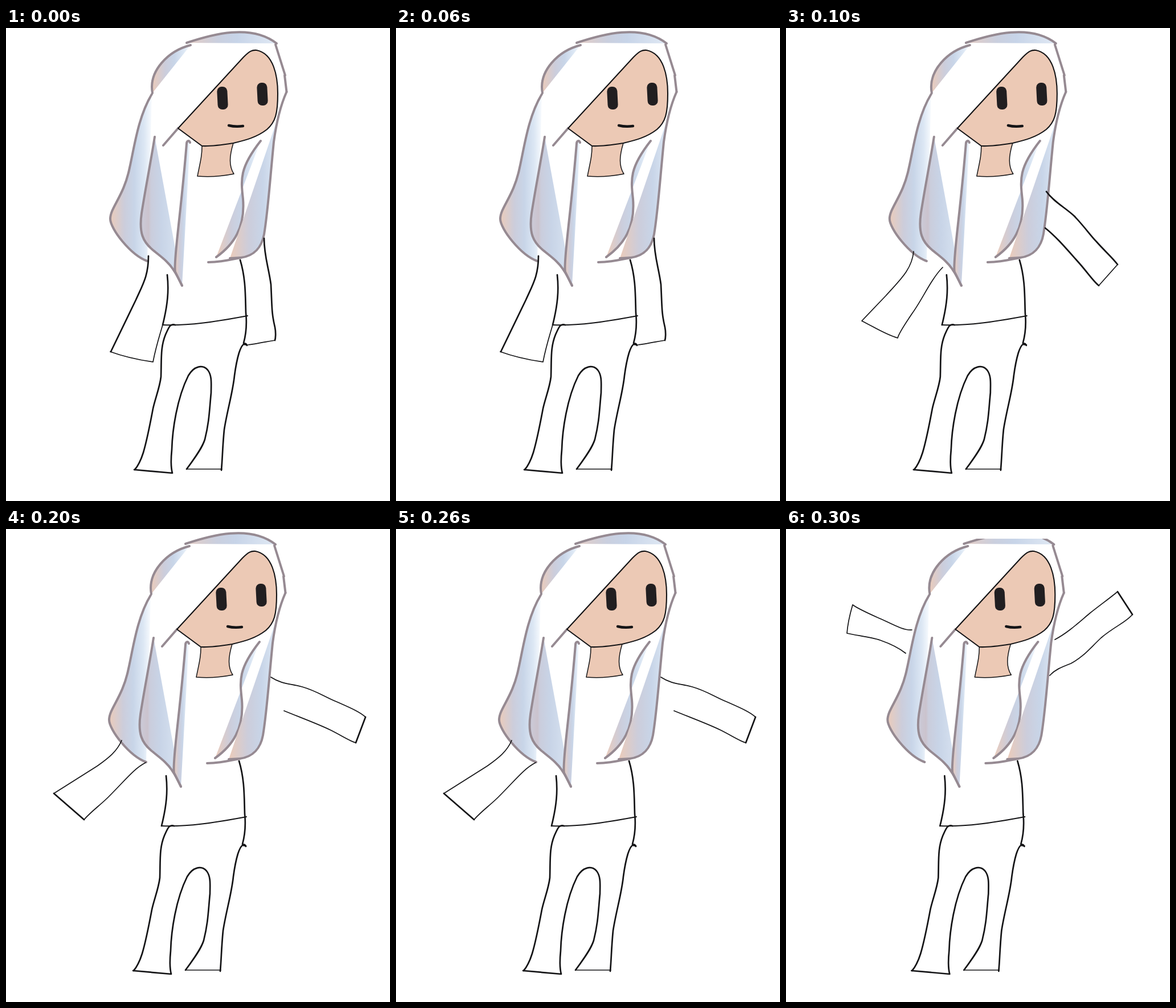
Write an HTML page that moves like this. It is 674 px wide and 830 px high and loops after 0.4 s.

```html
<!DOCTYPE html>
<html lang="en">
<head>
<meta charset="utf-8">
<title>Waving figure</title>
<style>
html, body { margin: 0; width: 100%; height: 100%; overflow: hidden; background: #fff; }
svg { display: block; width: 674px; height: 830px; }
path { fill: none; stroke-linejoin: round; stroke-linecap: round; }
.hair { stroke: #968a92; stroke-width: 4; }
.shaded { fill: url(#sheen); }
.crown { fill: url(#crown); }
.lock { fill: url(#lock); }
.ink { stroke: #141416; stroke-width: 2.7; }
.thin { stroke-width: 1.7; }
.skin { fill: #ecc9b5; }
.eye { fill: #211e20; }
</style>
</head>
<body>
<svg viewBox="0 0 674 830">
  <defs>
    <linearGradient id="sheen">
      <stop offset="0" stop-color="#ebcbba"/>
      <stop offset=".34" stop-color="#cccddb"/>
      <stop offset=".58" stop-color="#c8d5e8"/>
      <stop offset=".82" stop-color="#dce7f4"/>
      <stop offset="1" stop-color="#f8fbfe"/>
    </linearGradient>
    <linearGradient id="crown">
      <stop offset="0" stop-color="#e6cdc4"/>
      <stop offset=".34" stop-color="#cacfde"/>
      <stop offset=".56" stop-color="#c7d4e8"/>
      <stop offset="1" stop-color="#e0e9f4"/>
    </linearGradient>
    <linearGradient id="lock">
      <stop offset="0" stop-color="#cbcbd9"/>
      <stop offset=".19" stop-color="#cbc3cd"/>
      <stop offset=".25" stop-color="#cacddc"/>
      <stop offset=".5" stop-color="#c8d4e7"/>
      <stop offset="1" stop-color="#dae5f2"/>
    </linearGradient>
    <clipPath id="crop"><rect x="-20" y="17" width="720" height="813"/></clipPath>
  </defs>
  <g id="body">
    <g class="hair">
      <path class="crown" d="M317 26C362 11 430-8 475 27"/>
      <path d="M473 29L490 83M489 83L492.5 112"/>
      <path class="shaded" d="M324 30C285 40 250 75 257 114"/>
      <path class="shaded" d="M256 116C232 155 225 210 217 245C207 295 183 315 183 335C183 352 218 398 248 409"/>
      <path class="lock" d="M261 191C255 230 245 280 238 325C233 360 241 375 256 388C270 400 284 409 293 423C300 433 305 443 309 452"/>
      <path class="shaded" d="M323 201C322 196 317 198 317 203C314 240 308 300 303 345C298 390 295 420 297 428L309 452"/>
      <path class="shaded" d="M447 198C410 245 412 265 416 300C420 350 400 380 369 402"/>
      <path class="shaded" d="M492.5 112C480 140 474 170 470 200C463 270 460 320 453 362C449 384 436 400 412 403L393 404"/>
      <path d="M355 411C372 411 386 408 412 403M302 176L276 206"/>
    </g>
    <path class="ink skin" style="stroke-width:1.5" d="M344 207C344 225 341 235 336 260C360 262 380 260 400 256C391 242 392 225 399 202"/>
    <path class="ink skin" style="stroke-width:2.1" d="M302 176L417 51C427 41 432 38 440 39C470 45 477 85 477 115C477 150 473 165 458 178C440 192 420 197 399 202C380 205 360 208 344 207Z"/>
    <rect class="eye" x="371" y="103" width="18" height="40" rx="8" transform="rotate(-3 380 123)"/>
    <rect class="eye" x="441" y="96" width="18" height="40" rx="8" transform="rotate(-3 450 116)"/>
    <path class="ink" style="stroke-width:4.4" d="M391 171Q403 174 416 172"/>
    <path class="ink" d="M283 433C286 460 284 485 275 521M411 407C421 440 420 470 421 500C423 520 422 535 417 553L421 554L423 557"/>
    <path class="ink" style="stroke-width:2" d="M275 521C320 523 370 515 424 505"/>
    <path class="ink" d="M297 521C288 518 286 525 280 538C271 560 273 580 272 612C270 630 262 650 258 668C252 700 247 725 241 745C237 758 232 768 226 775"/>
    <path class="ink" d="M225 775L292 781C289 770 290 750 291 740C292 705 300 650 320 610C330 593 345 590 354 600C362 610 360 625 360 640C357 670 357 690 349 722C345 735 335 750 317 774"/>
    <path class="ink thin" d="M317 774H379"/>
    <path class="ink" d="M378 776C380 755 380 735 383 705C388 672 398 640 401 610C403 595 406 580 409 570C412 561 414 557 417 555L423 556"/>
  </g>
  <path id="boldArms" class="ink"/>
  <path id="thinArms" class="ink thin"/>
</svg>
<script>
// Each pose: sideways body shift, bold arm lines, fine arm lines.
const poses = [
  { shift: 0,
    bold: "M250 400C250 435 240 450 228 477L184 568M453 369C453 400 461 420 465 450C467 490 466 500 472 525C474 535 473 545 472 548",
    fine: "M183 568C205 576 230 582 258 586C263 560 268 545 275 521M472 548C460 550 435 555 425 556" },
  { shift: -1.2,
    bold: "M457 287C470 305 490 315 506 330C525 350 535 365 545 375C560 392 572 402 582 415M549 452C540 445 530 430 515 413C490 385 475 367 455 351",
    fine: "M224 392C221 425 197 445 175 470L133 514C155 525 175 538 196 544C198 535 210 518 222 500C240 475 255 440 275 420M582 415L549 452" },
  { shift: -2,
    bold: "M84 464L137 510M631 330L614 375",
    fine: "M203 371C195 390 180 402 160 416L84 464M137 510C150 495 165 485 180 470C210 440 225 420 245 410M465 260C485 273 500 271 520 277C545 284 560 295 580 303C600 312 620 320 631 330M614 375C605 373 590 363 570 353C550 343 520 332 488 319" },
  { shift: -4.7, cropped: true,
    bold: "M582 110L608 150",
    fine: "M221 177C205 179 180 163 160 155C140 146 125 139 117 133C112 150 108 170 107 183C125 187 150 190 165 195C185 202 200 210 210 218M472 194C495 182 515 163 533 148C552 133 566 123 582 110M608 150C598 163 575 172 553 191C530 213 522 224 500 236C482 243 472 247 463 257" }
];
const byId = id => document.getElementById(id);
const body = byId("body"), boldArms = byId("boldArms"), thinArms = byId("thinArms");
const start = performance.now();

function draw() {
  const elapsed = Math.max(0, performance.now() - start);
  const pose = poses[Math.floor(elapsed / 100) % poses.length];
  body.setAttribute("transform", `translate(${pose.shift} 0)`);
  body.setAttribute("clip-path", pose.cropped ? "url(#crop)" : "none");
  boldArms.setAttribute("d", pose.bold);
  thinArms.setAttribute("d", pose.fine);
  requestAnimationFrame(draw);
}
draw();
</script>
</body>
</html>
```
